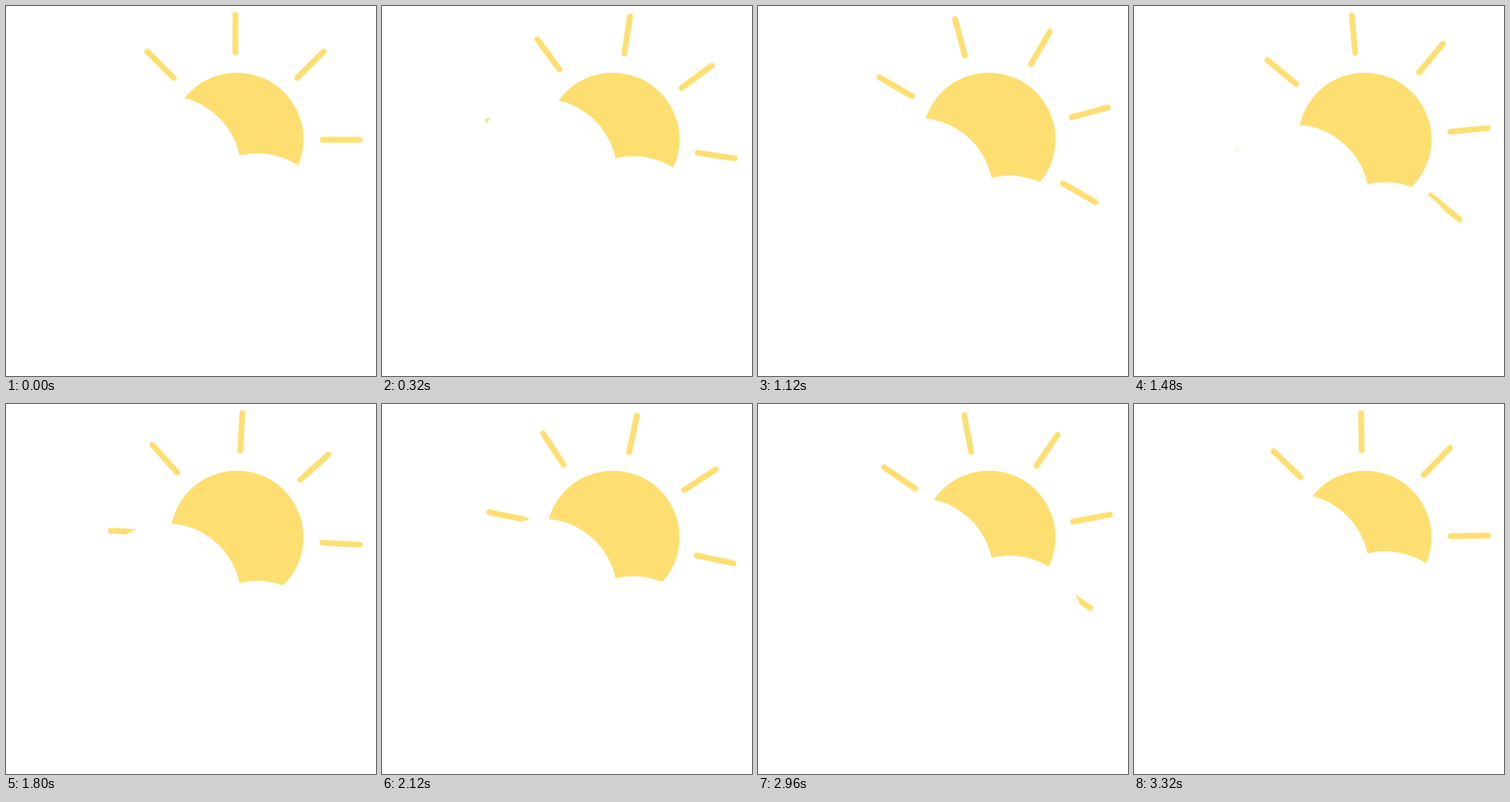
Recreate the animation shown at these times as an HTML page. Size 480 px wide and 480 px high, loop 3360 ms.

```html
<!DOCTYPE html>
<html lang="en">
<head>
<meta charset="utf-8">
<title>Sun behind a cloud</title>
<style>
  html, body { margin: 0; width: 100%; height: 100%; overflow: hidden; background: #fff; }
  svg { display: block; width: 100vw; height: 100vh; }
  .sun { fill: #fddf71; }
  .rays { stroke: #fddf71; stroke-width: 7.5; stroke-linecap: round; animation: spin 3360ms linear infinite; }
  .cloud { fill: #fff; animation: bob 1680ms cubic-bezier(.3333, 0, .6667, 1) infinite alternate; }

  /* Eight rays: a quarter turn loops seamlessly. */
  @keyframes spin { to { transform: rotate(90deg); } }
  @keyframes bob { to { transform: translateY(39px); } }
</style>
</head>
<body>
<svg viewBox="0 0 480 480">
  <circle class="sun" cx="299.5" cy="173" r="86.5"/>
  <g transform="translate(297.5 173.5)">
    <g class="rays">
      <g id="cross">
        <path id="pair" d="M0-161.7V-113.3M0 113.3V161.7"/>
        <use href="#pair" transform="rotate(90)"/>
      </g>
      <use href="#cross" transform="rotate(45)"/>
    </g>
  </g>
  <g class="cloud">
    <circle cx="207.3" cy="214.3" r="97.9"/>
    <circle cx="326" cy="289" r="98"/>
    <rect x="150" y="240" width="176" height="147"/>
  </g>
</svg>
</body>
</html>
```
